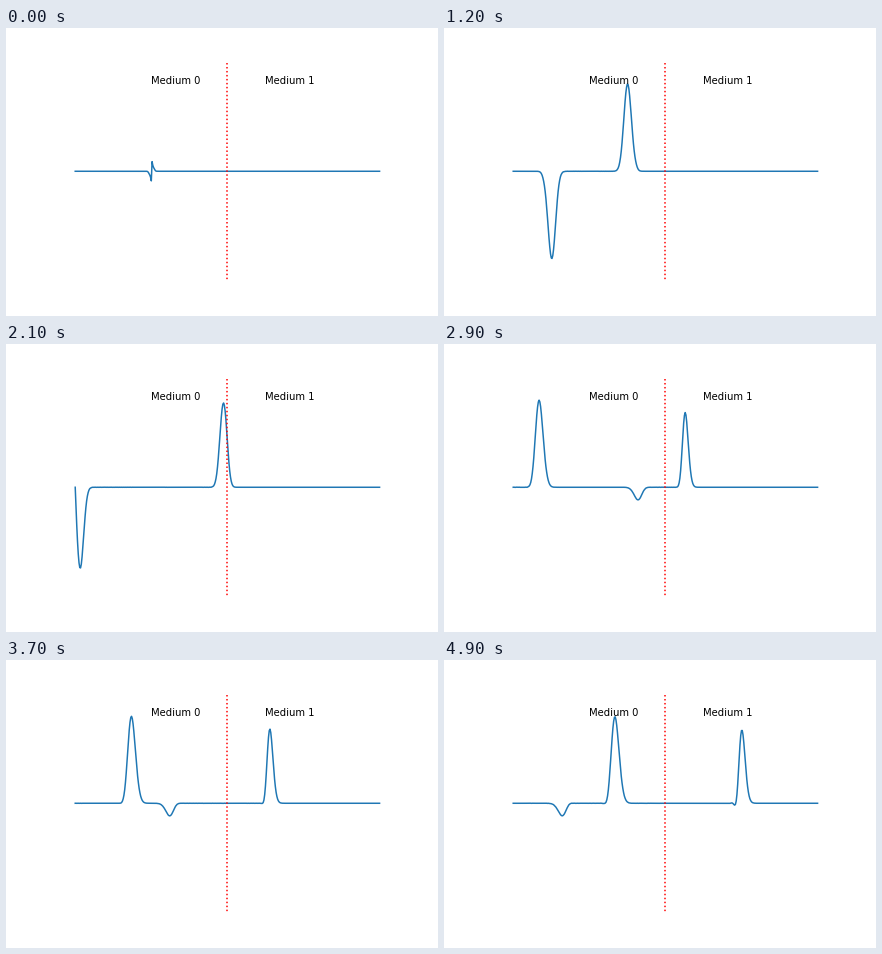
Write a matplotlib script that moves like this. It is 432 px wide and 288 px high and loops after 5000 ms.

```python
import matplotlib.pyplot as plt
import numpy as np
from matplotlib.animation import FuncAnimation

CELLS = 400
COURANT = 0.5
FRAMES = 50
STEPS_PER_FRAME = 10
SOURCE_CELL = 100
SOURCE_DELAY, SOURCE_WIDTH = 30, 10
SPEED_RATIO = 0.75


def simulate():
    """Leapfrog solution of a wave crossing from a fast into a slow medium."""
    e = np.zeros(CELLS + 1)
    h = np.zeros(CELLS)
    gain = np.full(CELLS + 1, COURANT)
    gain[CELLS // 2:] *= SPEED_RATIO ** 2
    snapshots = []
    for n in range(FRAMES * STEPS_PER_FRAME):
        pulse = np.exp(-0.5 * ((n - SOURCE_DELAY) / SOURCE_WIDTH) ** 2)
        h += COURANT * np.diff(e)
        h[SOURCE_CELL] -= 2 * COURANT * pulse
        e[1:-1] += gain[1:-1] * np.diff(h)
        if (n + 1) % STEPS_PER_FRAME == 0:
            snapshots.append(e.copy())
    return snapshots


waves = simulate()

fig = plt.figure(figsize=(6, 4), dpi=72, facecolor="white")
ax = fig.add_axes([0.125, 0.11, 0.775, 0.77])
ax.set_xlim(-0.05, 1.05)
ax.set_ylim(-1.3, 1.25)
ax.axis("off")

x = np.linspace(0, 1, CELLS + 1)
(wave,) = ax.plot(x, waves[0], color="tab:blue", lw=1.5)
ax.plot([0.5, 0.5], [1.25, -1.25], color="red", ls=":", lw=1.5)
for left, label in ((0.25, "Medium 0"), (0.625, "Medium 1")):
    ax.text(left, 1, label, fontsize=10, family="DejaVu Sans")


def update(frame):
    wave.set_ydata(waves[frame])
    return (wave,)


anim = FuncAnimation(fig, update, frames=FRAMES, interval=100,
                     repeat=True, repeat_delay=0)
plt.show()
```
